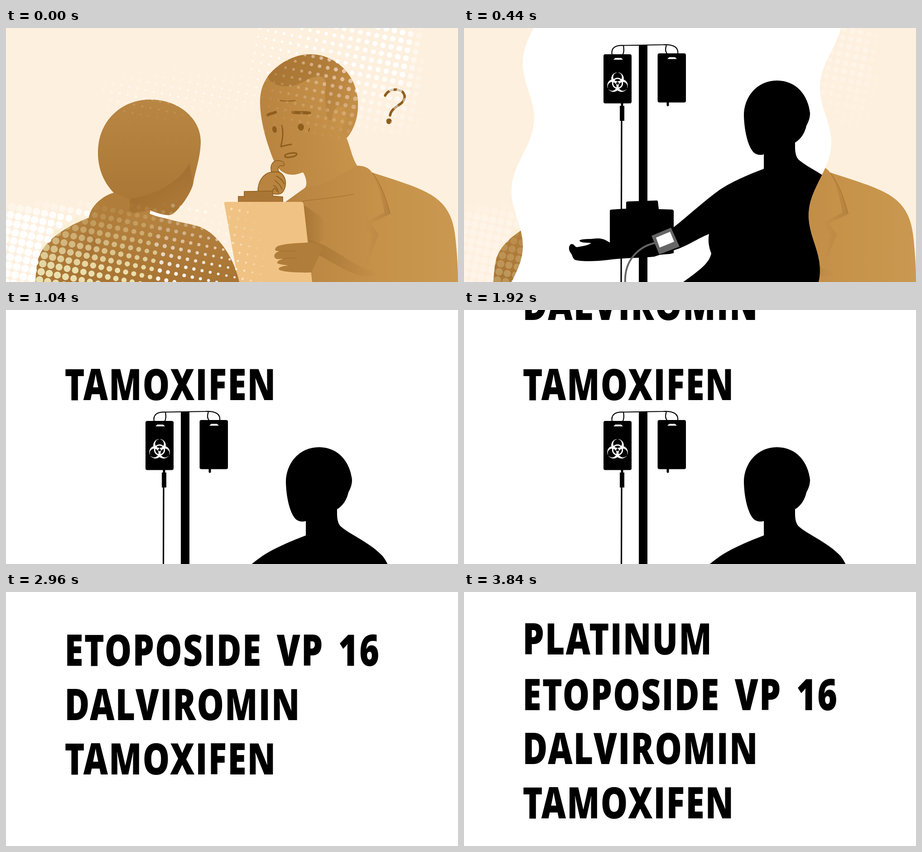
Write an HTML page that moves like this. It is 998 px wide and 561 px high and loops after 3880 ms.

```html
<!DOCTYPE html>
<html lang="en">
<head>
<meta charset="utf-8">
<title>Treatment</title>
<style>
html, body { margin: 0; width: 100%; height: 100%; overflow: hidden; background: #fff; }
svg { display: block; width: 998px; height: 561px; }
.ink { fill: none; stroke: #8f5d1c; stroke-linecap: round; stroke-linejoin: round; }
.soft { fill: none; stroke: #a06c2c; stroke-linecap: round; stroke-width: 1.5; opacity: .7; }
.words {
  font: 800 96.5px "Open Sans", "Noto Sans", sans-serif;
  font-stretch: 75%;
  letter-spacing: 3px;
  word-spacing: 14px;
}
</style>
</head>
<body>
<svg viewBox="0 0 998 561">
  <defs>
    <linearGradient id="skin" x1="0" x2="1" y1=".3" y2=".1">
      <stop offset="0" stop-color="#b9843f"/><stop offset="1" stop-color="#ca964d"/>
    </linearGradient>
    <linearGradient id="hair" x1="0" x2="1" y1="0" y2=".3">
      <stop offset="0" stop-color="#a87433"/><stop offset=".6" stop-color="#b07c39"/><stop offset="1" stop-color="#c38e47"/>
    </linearGradient>
    <linearGradient id="coat" x1="0" x2="1">
      <stop offset="0" stop-color="#b6823f"/><stop offset=".55" stop-color="#c6924a"/><stop offset="1" stop-color="#ca9850"/>
    </linearGradient>
    <linearGradient id="back" x1="0" x2="0" y1="0" y2="1">
      <stop offset="0" stop-color="#b98643"/><stop offset="1" stop-color="#a97534"/>
    </linearGradient>
    <linearGradient id="shade" x1="0" x2="1">
      <stop offset="0" stop-color="#9a672a" stop-opacity=".55"/><stop offset="1" stop-color="#9a672a" stop-opacity="0"/>
    </linearGradient>
    <linearGradient id="fold" x1="1" x2="0">
      <stop offset="0" stop-color="#96632a" stop-opacity=".35"/><stop offset="1" stop-color="#96632a" stop-opacity="0"/>
    </linearGradient>
    <linearGradient id="jaw" x1=".4" y1=".4" x2=".6" y2=".8">
      <stop offset="0" stop-color="#94612a" stop-opacity=".4"/><stop offset="1" stop-color="#94612a" stop-opacity="0"/>
    </linearGradient>
    <clipPath id="wipe"><path id="edge"/></clipPath>
  </defs>

  <g id="scene">
    <rect width="998" height="561" fill="#fef0de"/>

    <!-- man -->
    <path fill="url(#coat)" d="M600 400L617 384L660 353L745 240C758 265 764 286 775 304C790 304 802 309 808 319C860 336 908 350 938 368C974 390 989 420 993 470C997 510 998 535 998 561H600Z"/>
    <path fill="url(#skin)" d="M578 107C566 125 560 142 561 170C563 212 576 255 590 290C599 311 612 324 632 324C645 324 655 318 656 319C663 330 666 346 660 353L700 345L775 304C764 286 760 262 752 243C768 225 778 198 777 165C774 95 720 58 672 58C635 58 598 80 578 107Z"/>
    <path fill="url(#hair)" d="M578 107C598 80 635 58 672 58C720 58 774 95 777 165C778 198 768 225 752 243L730 221L745 190L738 172C727 172 722 184 720 203H708C709 184 703 160 705 140C709 114 704 107 690 107C670 107 656 123 632 128C608 132 584 125 578 107Z"/>
    <path fill="#c6924a" d="M720 203C720 184 731 171 742 173C754 177 754 200 747 214C742 222 734 223 730 220Z"/>
    <path class="soft" d="M655 382C694 378 734 374 768 367M809 320C830 348 840 380 848 410"/>
    <path fill="url(#fold)" d="M808 319C830 350 840 380 848 411L806 431L823 457L792 531C798 500 808 470 808 458L792 430L835 408C832 380 822 345 808 319Z"/>
    <path fill="url(#shade)" d="M656 390L700 420C712 445 705 468 690 474L666 469Z"/>
    <path fill="url(#shade)" d="M667 469C700 472 735 500 770 520C792 531 808 537 825 545L790 549C750 540 710 510 668 490Z"/>
    <path fill="#b88440" stroke="#8f5d1c" stroke-width="1.6" d="M556 362C556 338 568 321 586 318C582 301 590 292 603 293C613 294 618 301 612 305C607 302 602 305 601 309C600 314 602 317 605 319C617 326 620 342 615 355C611 366 605 368 594 367Z"/>
    <path class="ink" stroke-width="2" d="M586 318C594 318 598 317 603 319M597 327C605 331 611 337 614 344M594 337C601 342 607 349 609 356M591 348C597 351 601 357 602 364M589 358C592 353 596 354 598 361"/>
    <path fill="#aa7636" stroke="#8f5d1c" stroke-width="1.6" d="M513 385V372H526V361L589 360V371L611 373V385Z"/>
    <path fill="#f0c384" d="M482 388Q481 384 486 384H651Q656 384 657 389L676 561H513Z"/>
    <path fill="#b07d3a" d="M700 484C688 476 676 473 664 474C640 475 604 477 597 484C591 490 595 493 604 493C593 496 588 505 597 510C601 511 608 510 613 510C602 512 596 517 600 520C606 523 618 523 622 525C612 525 603 528 602 532C602 537 630 541 674 540Z"/>
    <path class="soft" d="M604 493C618 492 630 492 640 493M612 510C624 507 634 508 642 509"/>

    <g class="ink">
      <path stroke-width="6" d="M578 192C584 188 590 189 595 186"/>
      <path stroke-width="7" d="M634 186C646 188 658 186 670 188"/>
      <path stroke-width="2" d="M604 160C616 162 628 162 638 160M670 222L668 228"/>
      <path stroke-width="3" d="M609 215C614 235 609 250 607 262C615 260 622 258 630 257"/>
      <path stroke-width="3.4" d="M616 281C624 275 640 275 642 278C643 284 622 287 617 285Q615 283 616 281Z"/>
    </g>
    <g fill="#8f5d1c">
      <ellipse cx="593" cy="224" rx="5" ry="7.5" transform="rotate(-10 593 224)"/>
      <ellipse cx="651" cy="219" rx="6.8" ry="7.8"/>
    </g>
    <g id="query">
      <path class="ink" stroke-width="5.500" d="M837 149C844 137 856 134 866 137C883 141 884 156 873 166C861 175 850 180 848 193"/>
      <circle cx="845.500" cy="206" r="6.2" fill="#8f5d1c"/>
    </g>

    <!-- woman -->
    <path fill="url(#back)" d="M65 561C67 528 69 510 76 498C92 465 135 437 183 419C187 394 212 371 238 364L320 405C345 424 390 428 425 438C462 450 502 500 515 561Z"/>
    <path fill="url(#back)" d="M238 364C215 340 203 310 203 275C203 205 255 158 318 158C385 158 430 203 430 250C430 285 417 318 413 345C407 368 384 399 368 411C358 417 336 410 319 403L262 410Z"/>
    <path fill="url(#jaw)" d="M405 298C385 338 335 368 272 378L275 412L319 405C336 411 358 417 368 411C384 399 407 368 413 345Z"/>
    <path fill="#b07d3a" d="M238 364C212 371 187 394 183 419C181 445 190 462 206 476C240 455 276 425 273 378Z"/>
    <path fill="url(#fold)" d="M183 419C181 445 190 462 206 476L178 520C150 490 150 440 183 419Z"/>
    <path fill="none" stroke="#fff" stroke-width="7" stroke-linecap="round" d="M321 408C331 412 342 415 354 417"/>
    <g id="dots"></g>
  </g>

  <g id="room" clip-path="url(#wipe)">
    <rect width="998" height="561" fill="#fff"/>
    <g id="figure">
      <rect x="386" y="37" width="19" height="530"/>
      <path fill="none" stroke="#000" stroke-width="2.2" d="M327 60C324 44 333 38 352 38.500L440 37C464 36 474 43 472 58M352 38C353 46 354 53 350 60M447 37C445 45 443 50 449 58"/>
      <rect x="308" y="58" width="62" height="108.500" rx="4"/>
      <rect x="427.500" y="56" width="62.500" height="108.500" rx="4"/>
      <path fill="#fff" d="M330 70L334 66H347L351 70ZM449 68.500L453 64.500H466L470 68.500Z"/>
      <path d="M346.500 166h5v6h2.500v33h-10v-33h2.500zM447.500 164h5v7q-2.500 4-5 0z"/>
      <path fill="none" stroke="#000" stroke-width="3.2" d="M348 204L347 567"/>
      <g id="hazard" transform="translate(339 122) scale(.925)"></g>
      <path d="M358 385Q359 383 363 383L425 381Q428 381 428 383L430 400L460 401Q463 402 463 405V497L455 499L340 508L322 480V403Q323 401 326 401L358 399Z"/>
      <path d="M322 474C310 466 302 464 290 465C276 467 262 465 255 469C256 475 270 474 281 475C272 481 260 482 250 484C244 484 245 478 238 477C231 478 230 490 235 496C240 502 239 508 245 512C255 516 290 516 320 512C345 508 390 508 420 505L475 487C500 477 520 463 541 455C538 470 541 485 546 498C541 520 520 535 484 561H845C860 500 863 460 860 440C857 410 848 378 832 357C802 325 760 310 738 290C730 280 731 265 731 253C745 245 753 230 756 216C760 208 764 200 764 188C760 150 735 116 691 116C645 116 617 155 618 195C619 230 628 265 641 276C648 281 656 281 662 279V311C630 323 590 340 565 357C530 382 495 415 463 440L430 455Z"/>
      <path fill="#666" d="M414 459L457 441L476 483L431 500Z"/>
      <path fill="#fff" d="M424 463L455 450L464 472L432 485Z"/>
      <path fill="none" stroke="#666" stroke-width="4" d="M427 474C392 479 353 508 356 563"/>
    </g>
    <g id="words" class="words"></g>
  </g>
</svg>

<script>
const LOOP = 3880, STEP = 40;
const $ = id => document.getElementById(id);
const clamp = v => Math.max(0, Math.min(1, v));

function add(parent, tag, attrs, text) {
  const el = document.createElementNS('http://www.w3.org/2000/svg', tag);
  for (const k in attrs) el.setAttribute(k, attrs[k]);
  if (text) el.textContent = text;
  parent.appendChild(el);
  return el;
}

// Halftone: one tilted grid, with size and strength set by place.
function lowerDot(x, y) {
  const top = x > 185 && x < 360 ? 360 : 410 + 0.0065 * Math.max(0, 190 - x) ** 2;
  const coat = x > 68 && y > top;
  const r = 8.5 - Math.max(0, x - 60) * 0.0135;
  const a = coat ? clamp((y - 385) / 150) * 0.9 : clamp((y - 383) / 35);
  const fade = clamp((590 - x) / 90);
  return [r, a * fade, coat && x < 330 ? '#f1ebbb' : '#fff'];
}

function upperDot(x, y) {
  if (x < 540) {
    const a = clamp((x - 190) / 60) * clamp(1 - Math.abs(y - 145) / 70);
    const onHead = ((x - 317) / 114) ** 2 + ((y - 270) / 112) ** 2 < 1;
    return [2.3, a * (onHead ? 0.25 : 0.75), '#fff'];
  }
  const r = Math.min(6.3, 6.3 - (870 - x) * 0.0135);
  const a = clamp((250 - y) / 170) * clamp((925 - x) / 45);
  const onMan = ((x - 669) / 109) ** 2 + ((y - 165) / 108) ** 2 < 1;
  if (onMan) return [r, a * clamp((x - 540) / 220) * 0.9, '#f5dccd'];
  return [r, a, '#fff'];
}

const TILT = 0.2, PITCH = 18.3;
for (let i = -8; i < 66; i++) {
  for (let j = -14; j < 36; j++) {
    const x = PITCH * (i * Math.cos(TILT) - j * Math.sin(TILT));
    const y = PITCH * (i * Math.sin(TILT) + j * Math.cos(TILT));
    if (x < -9 || x > 925 || y < -9 || y > 570) continue;
    const [r, a, fill] = y > 300 ? lowerDot(x, y) : upperDot(x, y);
    if (a > 0.02 && r > 0.6)
      add($('dots'), 'circle', { cx: x.toFixed(1), cy: y.toFixed(1), r: r.toFixed(2), fill, opacity: a.toFixed(2) });
  }
}

// Biohazard sign: three lobes, three cuts, a ring.
const thrice = (tag, attrs) => [0, 120, 240].forEach(a =>
  add($('hazard'), tag, { ...attrs, transform: `rotate(${a})` }));
thrice('circle', { cy: -11, r: 15, fill: '#fff' });
thrice('circle', { cy: -15, r: 10.5 });
thrice('rect', { x: -2, y: -28, width: 4, height: 8 });
thrice('rect', { x: -0.5, y: -6, width: 1, height: 6 });
add($('hazard'), 'circle', { r: 11.7, fill: 'none', stroke: '#fff', 'stroke-width': 3 });
add($('hazard'), 'circle', { r: 3 });

// Baselines over time, as [ms, y] pairs; a line is hidden before its first key.
const lines = [
  ['TAMOXIFEN', [[1000, 105], [1040, 199], [1920, 199], [2000, 327], [2840, 327], [2960, 403], [3760, 403], [3840, 500]]],
  ['DALVIROMIN', [[1920, 22], [2000, 208], [2840, 208], [2960, 283], [3760, 283], [3840, 380]]],
  ['ETOPOSIDE VP 16', [[2880, 107], [2960, 163], [3760, 163], [3840, 261]]],
  ['PLATINUM', [[3760, 75], [3840, 138]]]
].map(([text, keys]) => ({ keys, el: add($('words'), 'text', { x: 0, y: 0 }, text) }));

const slide = [[960, 0], [1040, 187], [1920, 187], [2000, 374], [2840, 374], [2960, 561]];

// One common condensing factor for the heavy face.
const condense = 468 / lines[0].el.getComputedTextLength();
$('words').setAttribute('transform', `translate(129.500 0) scale(${condense} 1)`);

function track(keys, t) {
  if (t <= keys[0][0]) return keys[0][1];
  for (let i = 1; i < keys.length; i++) {
    const [t0, v0] = keys[i - 1], [t1, v1] = keys[i];
    if (t <= t1) return v0 + (v1 - v0) * (t - t0) / (t1 - t0);
  }
  return keys[keys.length - 1][1];
}

const wave = y => 485 - 0.0887 * y - 18.5 * Math.cos(2 * Math.PI * (y - 95) / 282);

// A wavy band that widens from the middle.
function band(k) {
  const left = [], right = [];
  for (let y = -12; y <= 576; y += 12) {
    left.push(`${(wave(y + 27 * k) - 328 * k).toFixed(1)} ${y}`);
    right.unshift(`${(wave(y - 27 * k) + 328 * k).toFixed(1)} ${y}`);
  }
  return `M${left.concat(right).join('L')}Z`;
}

function draw(now) {
  const t = Math.floor((now % LOOP) / STEP) * STEP;
  const k = Math.min(3, Math.max(0, (t - 40) / 400));
  $('edge').setAttribute('d', band(k));
  $('room').style.display = k > 0 ? '' : 'none';
  $('scene').style.display = t < 760 ? '' : 'none';
  $('dots').setAttribute('opacity', clamp(1 - t / 640));
  $('query').setAttribute('opacity', clamp(1 - t / 320));
  $('figure').setAttribute('transform', `translate(0 ${track(slide, t)})`);
  for (const { el, keys } of lines) {
    el.style.display = t < keys[0][0] ? 'none' : '';
    el.setAttribute('y', track(keys, t));
  }
}

const start = performance.now();
function tick() {
  draw(performance.now() - start);
  requestAnimationFrame(tick);
}
tick();
</script>
</body>
</html>
```
